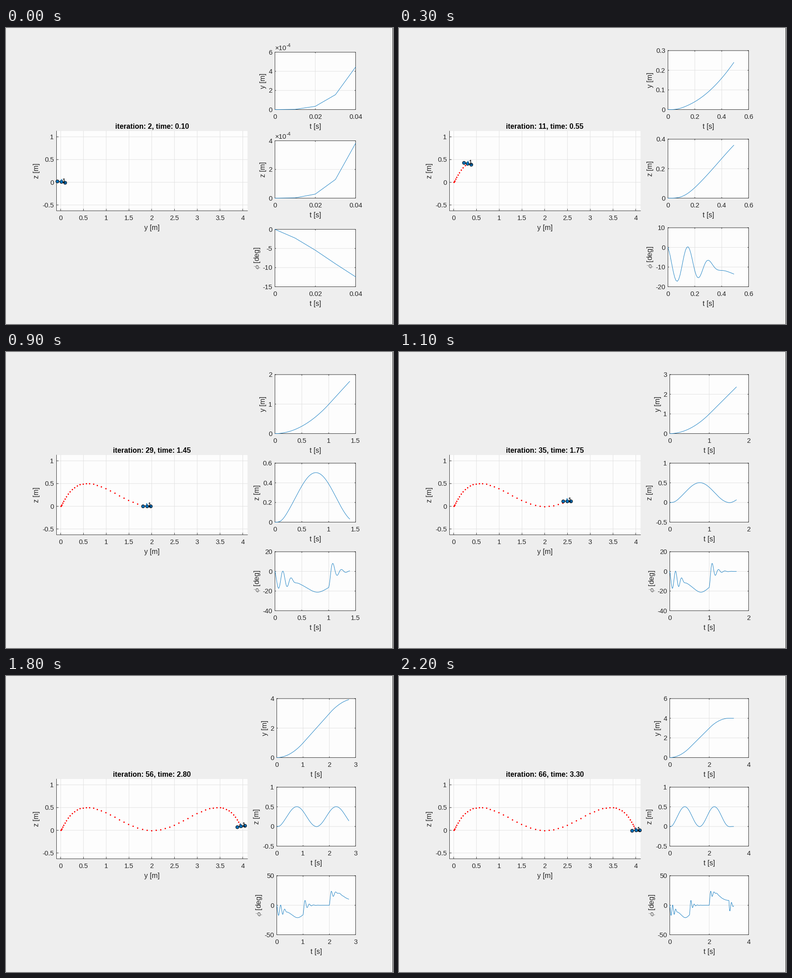
Recreate the animation shown at these times as a matplotlib script. Size 854 px wide and 655 px high, loop 2.3 s.

```python
import numpy as np
import matplotlib.pyplot as plt
from matplotlib.animation import FuncAnimation
from matplotlib.patches import Rectangle

W, H, DPI = 854, 655, 64
PT = 72 / DPI                      # points per pixel
FRAMES, INTERVAL = 23, 100
INK, BLUE, GRID = "#262626", "#0072BD", "#dfdfdf"
PANEL, BACK = "#fdfdfd", "#eeeeee"
TICK, LABEL = 14.8, 15.7           # font sizes in pixels

HOP = 2 * np.pi / 1.5              # angular rate of the hops
RING = 39                          # angular rate of the roll ringing

plt.rcParams["font.family"] = "Liberation Sans"
plt.rcParams["mathtext.fontset"] = "cm"

fig = plt.figure(figsize=(W / DPI, H / DPI), dpi=DPI, facecolor=BACK)
ax = fig.add_axes([0, 0, 1, 1])


def settle(t, tau, n):
    return 1 - np.exp(-(t / tau) ** n)


def pos_y(t):
    """Speed up for 1 s, cruise for 1 s, slow down for 1 s, with a little lag."""
    s = t - np.clip(.01 * (t - .45), 0, .005)
    path = np.where(s < 1, s ** 2,
                    np.where(s < 2, 2 * s - 1, 4 - np.clip(3 - s, 0, 1) ** 2))
    return path * settle(t, .0726, 1.88) + .002 * np.clip((t - 2.95) / .05, 0, 1)


def pos_z(t):
    """Two smooth hops of 1.5 s with a slight undershoot after each."""
    s = np.minimum(t - .011 * settle(t, .3, 2), 3)
    hop = .252 * (1 - np.cos(HOP * s)) * settle(t, .129, 1.84)
    dip = sum(np.exp(-((t - c) / .07) ** 2) for c in (1.53, 3.05))
    return hop - .004 * dip


def bank(push, t):
    """Roll in degrees that gives a sideways push while hopping."""
    return np.degrees(-push / (9.81 + .25 * HOP ** 2 * np.cos(HOP * t)))


def roll(t):
    """Each second a new push sets in and the roll rings around its new bank."""
    t = np.asarray(t, float)
    out, before = np.zeros_like(t), 0
    for k, push in enumerate((2, 0, -2, 0)):
        u = np.maximum(t - k, 0)
        skew = (.55, 0, 0, 1.6)[k]
        fade = np.exp(-(u / .3) ** 4) if k == 0 else np.exp(-8.8 * u)
        jump = bank(before, k - .04) - bank(push, k)
        swing = jump * (np.cos(RING * u) - skew * np.sin(RING * u)) * fade
        level = bank(push, k + np.maximum(u - .04, 0))
        out = np.where(t >= k, level + swing, out)
        before = push
    return out


def nice_ticks(values):
    """Finest 1-2-5 step that needs at most three intervals."""
    lo, hi = min(0, values.min()), max(0, values.max())
    for p in range(-6, 4):
        for m in (1, 2, 5):
            step = m * 10.0 ** p
            a = int(np.floor(lo / step + 1e-9))
            b = int(np.ceil(hi / step - 1e-9))
            if b - a <= 3:
                return np.arange(a, b + 1) * step


def text(x, y, s, size=TICK, color=INK, **kw):
    ax.text(x, y, s, fontsize=size * PT, color=color, **kw)


def line(x, y, color=INK, width=.9, **kw):
    ax.plot(x, y, color=color, lw=width * PT, snap=False, **kw)


def label_width(s):
    return TICK * sum({".": .278, "-": .333}.get(c, .556) for c in s)


def panel(box, xlim, ylim, xticks, yticks, xname, yname, tick, framed, scale=1):
    """Draw one set of axes and return its data-to-pixel functions."""
    l, t, r, b = box

    def px(v):
        return l + (np.asarray(v) - xlim[0]) / (xlim[1] - xlim[0]) * (r - l)

    def py(v):
        return b - (np.asarray(v) - ylim[0]) / (ylim[1] - ylim[0]) * (b - t)

    ax.add_patch(Rectangle((l, t), r - l, b - t, fc=PANEL, ec="none"))
    for x in px(xticks):
        line([x, x], [t, b], GRID)
    for y in py(yticks):
        line([l, r], [y, y], GRID)
    for x, v in zip(px(xticks), xticks):
        line([x, x], [b - tick, b])
        if framed:
            line([x, x], [t, t + tick])
        text(x, b + 20.7, f"{v:g}", ha="center")
    names = [f"{v * scale:g}" for v in yticks]
    for y, s in zip(py(yticks), names):
        line([l, l + tick], [y, y])
        if framed:
            line([r - tick, r], [y, y])
        text(l - 6, y + 5.3, s, ha="right")
    if framed:
        line([l, r, r, l, l], [t, t, b, b, t])
    else:
        line([l, l, r], [t, b, b])
    text((l + r) / 2, b + 42, xname, LABEL, ha="center")
    text(l - 18 - max(map(label_width, names)), (t + b) / 2, yname, LABEL,
         rotation=90, ha="center", va="center")
    if scale != 1:
        text(l, t - 4.3, "×10")
        text(l + 25.5, t - 11, "-4", 11)
    return px, py


def draw_flight(it, now):
    box = (111.5, 228, 533, 404.5)
    px, py = panel(box, (-.092, 4.105), (-.628, 1.128), np.arange(9) / 2,
                   np.arange(-1, 3) / 2, "y [m]", "z [m]", 4, False)
    text(322, 222.5, f"iteration: {it}, time: {now:.2f}", LABEL, "black",
         weight="bold", ha="center")

    past = np.arange(it + 1) * .05
    ax.plot(px(pos_y(past)), py(pos_z(past)), "o", color="red", ms=3 * PT, mew=0)

    y, z = pos_y(now), pos_z(now)
    a = np.radians(float(roll(now)))
    arm = np.array([-1, 0, 1]) * .086
    cx, cy = float(px(y)), float(py(z))
    line(px(y + arm * np.cos(a)), py(z + arm * np.sin(a)), "black", marker="o",
         ms=7 * PT, mfc=BLUE, mec="black", mew=PT)
    line([cx, cx - 5 * np.sin(a)], [cy, cy - 5 * np.cos(a)], BLUE, 2)
    text(cx + 2.5, cy + 2.2, "1", TICK, "black")


def draw_charts(now):
    t = np.arange(round((now - .06) * 100) + 1) * .01
    series = [pos_y(t), pos_z(t), roll(t)]
    ticks = [nice_ticks(v) for v in series]
    tt = nice_ticks(t)
    left = 597.5 if ticks[1][0] < 0 else 593.5
    tiny = ticks[0][-1] < 1e-3
    names = ["y [m]", "z [m]", r"$\phi$ [deg]"]
    for i, (v, yt, name) in enumerate(zip(series, ticks, names)):
        low = 180.5 + 196 * i
        top = low - 130.5 + 3.5 * tiny
        scale = 1e4 if yt[-1] - yt[0] < 1e-3 else 1
        px, py = panel((left, top, 771.5, low), (0, tt[-1]), (yt[0], yt[-1]),
                       tt, yt, "t [s]", name, 2, True, scale)
        line(px(t), py(v), BLUE, .85)


def draw(k):
    ax.cla()
    ax.set_xlim(0, W)
    ax.set_ylim(H, 0)
    ax.axis("off")
    it = min(2 + 3 * k, 66)
    now = it * .05
    draw_flight(it, now)
    draw_charts(now)
    line([W - .5, W - .5], [0, H], width=1)


anim = FuncAnimation(fig, draw, frames=FRAMES, interval=INTERVAL,
                     repeat=True, repeat_delay=0)
plt.show()
```
